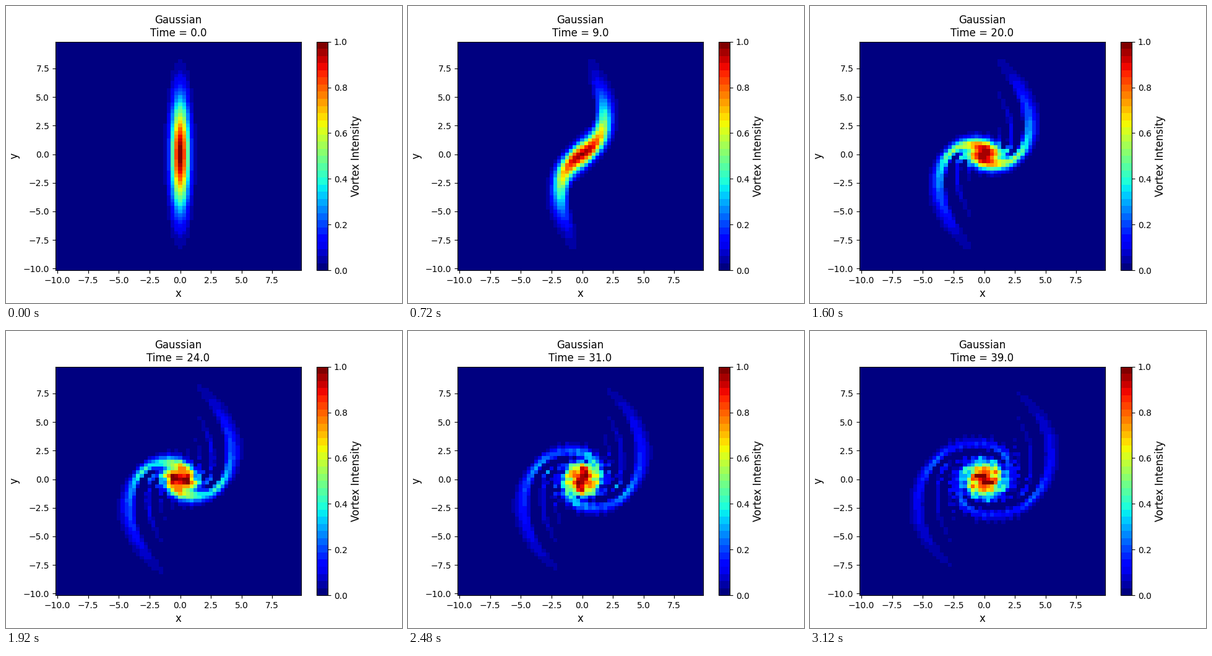
A matplotlib script that plays this animation: 640 by 480 pixels, repeating every 3.2 s.

```python
import numpy as np
import matplotlib.pyplot as plt
from matplotlib.animation import FuncAnimation

N, L, NU = 64, 20.0, 0.001
FRAMES, FRAME_DT, SUBSTEPS = 40, 1.0, 20

dx = L / N
x = -L / 2 + dx * np.arange(N)
X, Y = np.meshgrid(x, x)

k = 2 * np.pi * np.fft.fftfreq(N, dx)
KX, KY = np.meshgrid(k, k)
K2 = KX**2 + KY**2
K2[0, 0] = 1.0


def diff(f, axis):
    """Periodic central difference."""
    return (np.roll(f, -1, axis) - np.roll(f, 1, axis)) / (2 * dx)


def laplacian(f):
    shifted = sum(np.roll(f, s, a) for s in (-1, 1) for a in (0, 1))
    return (shifted - 4 * f) / dx**2


def rhs(w):
    """Vorticity advected by its own stream function, plus diffusion."""
    psi = np.fft.ifft2(-np.fft.fft2(w) / K2).real
    advect = diff(psi, 1) * diff(w, 0) - diff(psi, 0) * diff(w, 1)
    return advect + NU * laplacian(w)


def rk4(w, h):
    k1 = rhs(w)
    k2 = rhs(w + h / 2 * k1)
    k3 = rhs(w + h / 2 * k2)
    k4 = rhs(w + h * k3)
    return w + h / 6 * (k1 + 2 * k2 + 2 * k3 + k4)


def solve():
    w = np.exp(-2 * X**2 - Y**2 / 20)
    states = [w]
    for _ in range(FRAMES - 1):
        for _ in range(SUBSTEPS):
            w = rk4(w, FRAME_DT / SUBSTEPS)
        states.append(w)
    return states


states = solve()

plt.rcParams["font.family"] = "DejaVu Sans"
fig, ax = plt.subplots(figsize=(6.4, 4.8), dpi=100)
mesh = ax.pcolormesh(X, Y, states[0], shading="nearest",
                     cmap=plt.get_cmap("jet", 32), vmin=0, vmax=1)
bar = fig.colorbar(mesh, ax=ax)
bar.set_label("Vortex Intensity", fontsize=12)
ax.set_xlabel("x", fontsize=12)
ax.set_ylabel("y", fontsize=12)
title = ax.set_title("Gaussian\nTime = 0.0", fontsize=12)


def update(i):
    mesh.set_array(states[i])
    title.set_text(f"Gaussian\nTime = {i * FRAME_DT:.1f}")
    return mesh, title


anim = FuncAnimation(fig, update, frames=FRAMES, interval=80,
                     repeat=True, repeat_delay=0, blit=False)
plt.show()
```
